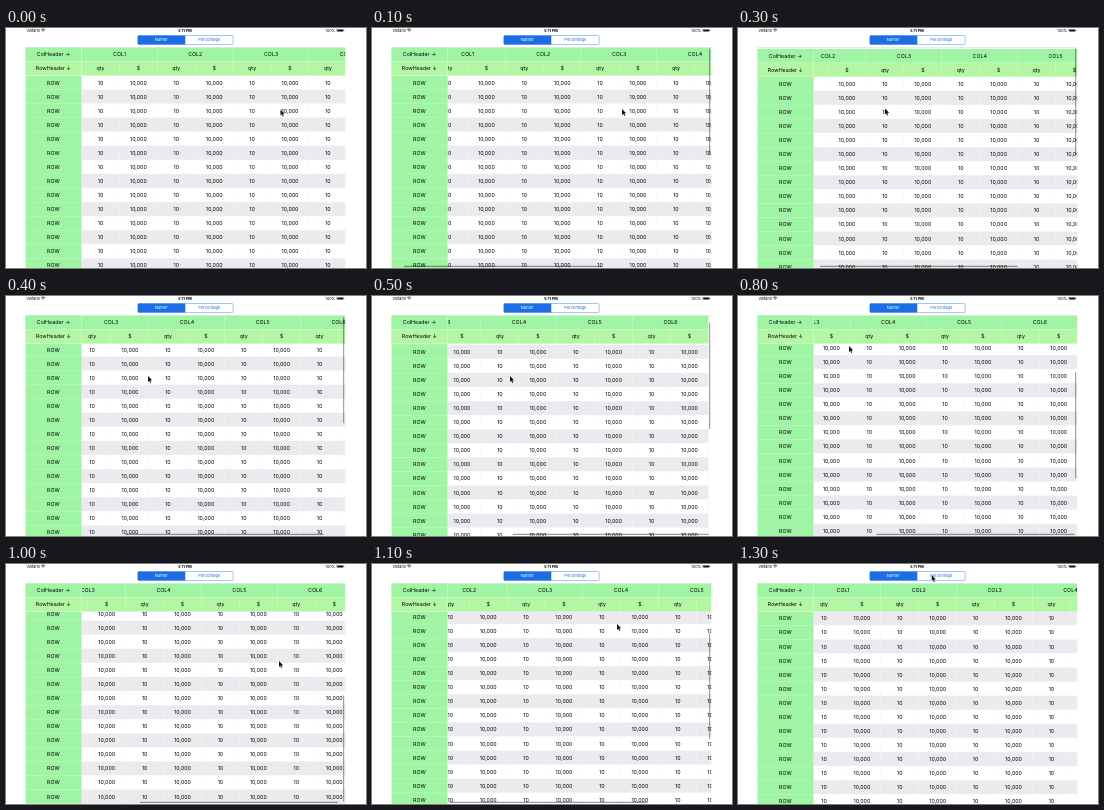
These frames come from a looping animation (360x240 px, 1.4 s). An HTML page with a canvas:

```html
<!DOCTYPE html>
<html lang="en">
<head>
<meta charset="utf-8">
<title>Scrolling table</title>
<style>
html, body { margin: 0; width: 100%; height: 100%; overflow: hidden; background: #fff; }
canvas { display: block; width: 360px; height: 240px; }
</style>
</head>
<body>
<canvas id="stage"></canvas>
<script>
const canvas = document.getElementById('stage');
const ctx = canvas.getContext('2d');
const dpr = window.devicePixelRatio || 1;
canvas.width = 360 * dpr;
canvas.height = 240 * dpr;

// The tablet screen is 1024 x 768 points, shown at 5/16 size.
const SCALE = 0.3125, LEFT = 19.3;
const W = 1024, H = 768, TOP = 62.5, ROW = 45, SIDE = 180, COL = 121.3;
const GROUPS = 6, ROWS = 30;
const MAX_X = SIDE + GROUPS * 2 * COL - W;
const MAX_Y = TOP + (ROWS + 2) * ROW - H;
const BLUE = '#1c6fe3', GREEN = '#a0f5a5', LIME = '#b3f7a5', GRAY = '#ebebef';

// Per 100 ms: scroll x, scroll y, pointer x, pointer y (stage pixels).
const POSES = [
  [0, 0, 274.5, 81.5], [18, 0, 250, 81], [62, -0.5, 198, 80], [99.2, -1.3, 147, 80.5],
  [160, 1, 142, 80], [194, 12.7, 138, 80], [191, 27, 118, 58], [190.7, 42, 98, 30],
  [190.7, 115, 111, 50], [187, 180, 190, 75], [183.3, 229.8, 273, 97],
  [92, 100, 245, 60], [8.5, 14.2, 210, 25], [8.5, 14.2, 193.7, 11]
];

const clamp = (v, lo, hi) => Math.min(hi, Math.max(lo, v));

function box(x, y, w, h, color) {
  ctx.fillStyle = color;
  ctx.fillRect(x, y, w, h);
}

function text(str, x, y, size = 17, color = '#000', align = 'center', weight = '') {
  ctx.font = `${weight} ${size}px Inter, "Liberation Sans", sans-serif`;
  ctx.textAlign = align;
  ctx.fillStyle = color;
  ctx.fillText(str, x, y + size * 0.35);
}

function cell(str, x, y, w, bg, line) {
  box(x, y, w, ROW, bg);
  box(x + w - 1, y, 1, ROW, line);
  box(x, y + ROW - 1, w, 1, line);
  text(str, x + w / 2, y + ROW / 2);
}

function clipped(x, y, draw) {
  ctx.save();
  ctx.beginPath();
  ctx.rect(x, y, W - x, H - y);
  ctx.clip();
  draw();
  ctx.restore();
}

function statusBar() {
  text('Veltano', 4, 8, 12, '#000', 'left');
  ctx.strokeStyle = '#111';
  ctx.lineWidth = 2;
  for (const r of [2, 5.5, 9]) {
    ctx.beginPath();
    ctx.arc(57, 12, r, -Math.PI * 0.75, -Math.PI * 0.25);
    ctx.stroke();
  }
  text('5:11 PM', 511, 8, 12, '#000', 'center', 'bold');
  text('100%', 992, 8, 12, '#000', 'right');
  ctx.lineWidth = 1;
  ctx.strokeRect(997, 4, 21, 8);
  box(998.5, 5.5, 18, 5, '#111');
  box(1018.5, 6.5, 2, 3, '#111');
}

function tabs() {
  ctx.beginPath();
  ctx.roundRect(360, 24, 305, 29, 4);
  ctx.strokeStyle = BLUE;
  ctx.lineWidth = 1.3;
  ctx.stroke();
  ctx.beginPath();
  ctx.roundRect(360, 24, 152, 29, [4, 0, 0, 4]);
  ctx.fillStyle = BLUE;
  ctx.fill();
  text('Numer', 435, 38.5, 13, '#fff');
  text('Percentage', 589, 38.5, 13, BLUE);
}

function table(sx, sy) {
  const top = TOP + Math.max(0, -sy), body = top + 2 * ROW;
  const colX = i => SIDE + i * COL - sx;
  const rowY = i => TOP + (i + 2) * ROW - sy;

  clipped(SIDE, body, () => {
    for (let r = 0; r < ROWS; r++) {
      const [bg, line] = r % 2 ? [GRAY, '#f7f7f9'] : ['#fff', '#ededed'];
      for (let c = 0; c < GROUPS * 2; c++)
        cell(c % 2 ? '10,000' : '10', colX(c), rowY(r), COL, bg, line);
    }
  });
  clipped(SIDE, top, () => {
    for (let g = 0; g < GROUPS; g++) {
      cell('COL' + (g + 1), colX(2 * g), top, 2 * COL, GREEN, '#d5fbd3');
      cell('qty', colX(2 * g), top + ROW, COL, LIME, '#d5fbc9');
      cell('$', colX(2 * g + 1), top + ROW, COL, LIME, '#d5fbc9');
    }
  });
  clipped(0, body, () => {
    for (let r = 0; r < ROWS; r++) cell('ROW', 0, rowY(r), SIDE, GREEN, '#bdf8bf');
  });
  cell('ColHeader →', 0, top, SIDE, GREEN, '#d5fbd3');
  cell('RowHeader ↓', 0, top + ROW, SIDE, LIME, '#d5fbc9');
  box(0, TOP - 1, W, 1, '#a8c8a8');
}

// Start and length of a scroll thumb on a track.
function thumb(from, to, view, scroll, max) {
  const len = (to - from) * view / (view + max);
  const start = from + (to - from - len) * Math.max(0, scroll) / max;
  return [start, clamp(start + len, from, to) - start];
}

function scrollBars(sx, sy) {
  const [x, w] = thumb(4, W - 8, W, sx, MAX_X);
  const [y, h] = thumb(TOP + 3, H - 8, H - TOP, sy, MAX_Y);
  ctx.fillStyle = 'rgba(0,0,0,.4)';
  ctx.beginPath();
  ctx.roundRect(x, H - 7, w, 3.5, 1.7);
  ctx.roundRect(W - 7, y, 3.5, h, 1.7);
  ctx.fill();
}

function pointer(x, y) {
  const shape = [[0, 0], [0, 6], [1.3, 4.8], [2.2, 6.9], [3.2, 6.5], [2.3, 4.4], [4.1, 4.3]];
  ctx.beginPath();
  for (const [px, py] of shape) ctx.lineTo(x + px, y + py);
  ctx.closePath();
  ctx.strokeStyle = '#fff';
  ctx.lineWidth = 0.8;
  ctx.stroke();
  ctx.fillStyle = '#111';
  ctx.fill();
}

function frame(now) {
  const step = Math.floor(now % 1400 / 100);
  const [sx, sy, px, py] = POSES[step];

  ctx.setTransform(dpr, 0, 0, dpr, 0, 0);
  box(0, 0, 360, 240, '#fff');
  ctx.save();
  ctx.translate(LEFT, 0);
  ctx.scale(SCALE, SCALE);
  statusBar();
  tabs();
  table(sx / SCALE, sy / SCALE);
  if (step > 0 && step < 12) scrollBars(sx / SCALE, sy / SCALE);
  ctx.restore();
  pointer(px, py);
}

const start = performance.now();
function loop() {
  frame(performance.now() - start);
  requestAnimationFrame(loop);
}
loop();
</script>
</body>
</html>
```
